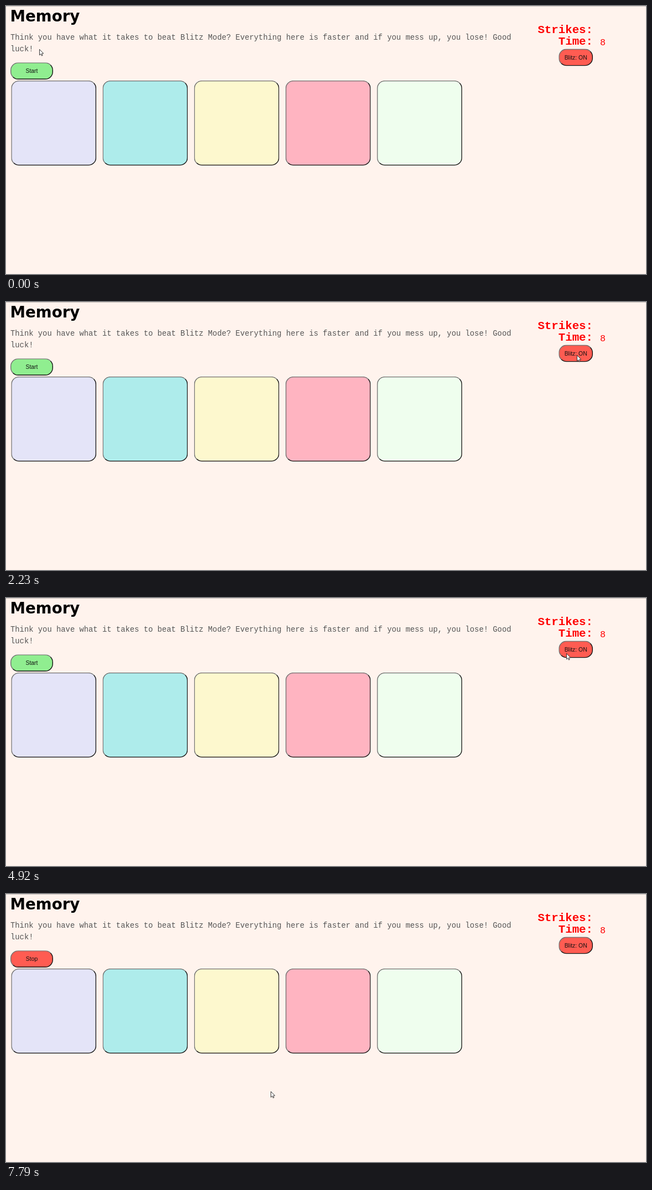
Write an HTML page with a canvas that moves like this. It is 1156x485 px and loops after 8 s.

```html
<!DOCTYPE html>
<html lang="en">
<head>
<meta charset="utf-8">
<title>Memory game</title>
<style>
  html, body { margin: 0; width: 100%; height: 100%; overflow: hidden; background: #fff3ed; }
  canvas { display: block; }
</style>
</head>
<body>
<canvas id="stage" width="1156" height="485"></canvas>
<script>
const ctx = document.getElementById('stage').getContext('2d');
const LOOP = 8000;
const GREEN = '#90ee90', RED = '#ff5c52';
const LIGHT_EDGE = '#707070', DARK_EDGE = '#141414';
const MONO = '"Liberation Mono", "Courier New", monospace';
const SANS = '"Liberation Sans", Arial, sans-serif';
const TILES = ['#e4e4f8', '#aeeceb', '#fdf8ce', '#ffb4c1', '#effeee'];

const BLITZ_TEXT = [
  'Think you have what it takes to beat Blitz Mode? Everything here is faster and if you mess up, you lose! Good',
  'luck!'
];
const CLASSIC_TEXT = [
  'Welcome to Classic Memory! Repeat back the pattern by pressing the buttons. You get 15 seconds per round and 3',
  'strikes a game. Good luck!'
];

// A button toggles when a press is released
const HOLD = 120;
const BLITZ_PRESSES = [2560, 3180, 5700, 6650];
const START_PRESSES = [7330];
const isDown = (presses, t) => presses.some(p => t >= p && t < p + HOLD);
const isToggled = (presses, t) => presses.filter(p => t >= p + HOLD).length % 2 === 1;

// Eased glide to a point, bowed vertically by `bend`
const glide = (start, end, x, y, bend = 0) => ({
  start, end,
  at(u, from) {
    const e = (1 - Math.cos(Math.PI * u)) / 2;
    return {
      x: from.x + (x - from.x) * e,
      y: from.y + (y - from.y) * e + bend * Math.sin(Math.PI * e)
    };
  }
});

// Two widening turns around the score panel
const orbit = (start, end) => ({
  start, end,
  at(u) {
    const angle = Math.PI * (0.5 + 4 * u);
    return {
      x: 1031 + (74 + 30 * u) * Math.cos(angle),
      y: 60 + (36 + 14 * u) * Math.sin(angle)
    };
  }
});

const MOVES = [
  glide(210, 1000, 923, 76, -25),
  glide(1010, 1440, 1016, 122, -12),
  glide(1600, 1980, 1031, 96),
  orbit(3300, 4512),
  glide(4512, 4800, 1012, 100),
  glide(6160, 6220, 1010, 102),
  glide(6770, 7150, 44.5, 116, 61),
  glide(7170, 7330, 34, 113),
  glide(7480, 7790, 478, 357, 25)
];

function pointerAt(t) {
  let tip = { x: 60, y: 78 };
  for (const move of MOVES) {
    if (t < move.start) break;
    tip = move.at(Math.min(1, (t - move.start) / (move.end - move.start)), tip);
  }
  return tip;
}

function label(text, x, y, font, color = '#000', align = 'left') {
  ctx.font = font;
  ctx.fillStyle = color;
  ctx.textAlign = align;
  ctx.fillText(text, x, y);
}

function polygon(points) {
  ctx.beginPath();
  points.forEach(([x, y]) => ctx.lineTo(x, y));
  ctx.closePath();
}

// Rounded box with a bevelled edge, mitred at two corners
function box(x, y, w, h, fill, pressed = false) {
  const line = 1.4, r = 14;
  const outline = () => {
    ctx.beginPath();
    ctx.roundRect(x + line / 2, y + line / 2, w - line, h - line, r - line / 2);
  };
  const edge = (color, cornerX, cornerY) => {
    ctx.save();
    polygon([[x, y + h], [x + r, y + h - r], [x + w - r, y + r], [x + w, y], [cornerX, cornerY]]);
    ctx.clip();
    outline();
    ctx.strokeStyle = color;
    ctx.lineWidth = line;
    ctx.stroke();
    ctx.restore();
  };
  outline();
  ctx.fillStyle = fill;
  ctx.fill();
  edge(pressed ? DARK_EDGE : LIGHT_EDGE, x, y);
  edge(pressed ? LIGHT_EDGE : DARK_EDGE, x + w, y + h);
}

function button(text, x, y, w, h, fill, pressed) {
  box(x, y, w, h, fill, pressed);
  label(text, x + w / 2, y + h / 2 + 3.5, '10.4px ' + SANS, '#111', 'center');
}

function pointer({ x, y }) {
  ctx.save();
  ctx.translate(x + 0.5, y + 0.5);
  polygon([[0, 0], [0, 10.4], [2.4, 8.2], [4, 11.6], [5.6, 10.9], [4.1, 7.6], [7.2, 7.4]]);
  ctx.fillStyle = '#fff';
  ctx.fill();
  ctx.strokeStyle = '#222';
  ctx.lineWidth = 0.9;
  ctx.stroke();
  ctx.restore();
}

function draw(t) {
  const blitz = !isToggled(BLITZ_PRESSES, t);
  const playing = isToggled(START_PRESSES, t);

  ctx.fillStyle = '#fff3ed';
  ctx.fillRect(0, 0, 1156, 485);
  ctx.fillStyle = '#c9c1bd';
  ctx.fillRect(0, 0, 1156, 1);

  label('Memory', 7.5, 28, 'bold 27.68px "DejaVu Sans", Verdana, sans-serif');
  (blitz ? BLITZ_TEXT : CLASSIC_TEXT).forEach((line, i) =>
    label(line, 8, 61 + i * 20.5, '13.84px ' + MONO, '#555'));

  label('Strikes:', 1060, 49, 'bold 20.76px ' + MONO, '#f00', 'right');
  label('Time:', 1060, 70, 'bold 20.76px ' + MONO, '#f00', 'right');
  label(blitz ? '8' : '15', 1083, 70.5, '16.6px ' + MONO, '#f00', 'right');

  button(blitz ? 'Blitz: ON' : 'Blitz: OFF', 998.3, 77.6, 61.7, 30.8,
    blitz ? RED : GREEN, isDown(BLITZ_PRESSES, t));
  button(playing ? 'Stop' : 'Start', 8, 102.2, 77, 30.8,
    playing ? RED : GREEN, isDown(START_PRESSES, t));
  TILES.forEach((fill, i) => box(9.3 + i * 165.2, 134.9, 153.8, 153.8, fill));

  pointer(pointerAt(t));
}

const begin = performance.now();
function tick() {
  draw((performance.now() - begin) % LOOP);
  requestAnimationFrame(tick);
}
tick();
</script>
</body>
</html>
```
